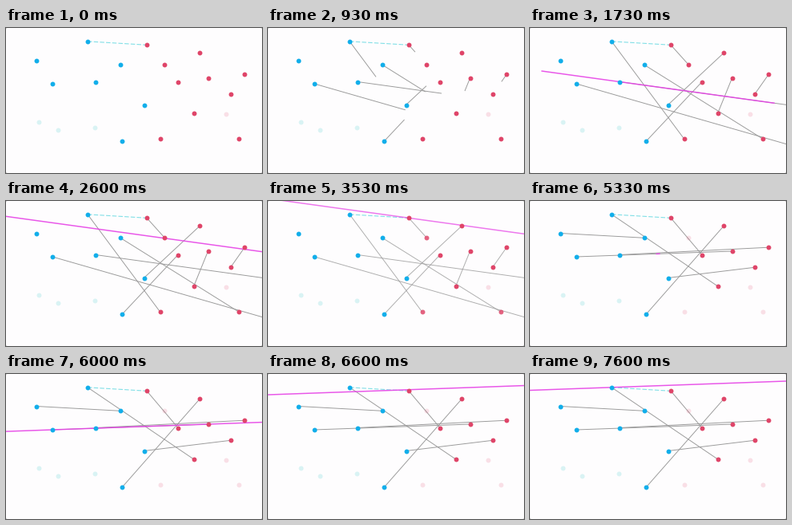
Animation of 320 by 182 pixels, one loop 7.67 s. Source, as a matplotlib script:

```python
import matplotlib.pyplot as plt
from matplotlib.animation import FuncAnimation
from matplotlib.patches import FancyBboxPatch

W, H, DPI = 320, 182, 100
FRAMES, LOOP_MS = 115, 7670
STEP = 12                # frames per animated move
ROUND_STARTS = (7.6, 65.6)
CLEAR_START = 47.6
PT = 72 / DPI            # points per pixel

BLUE, RED = "#12aeea", "#df4569"
GRAY, MAGENTA, CYAN = "#9a9a9a", "#e63fe6", "#7fdfe6"
DIM = 0.16

blue = [(38, 40.5), (58, 70), (102, 16.8), (112, 67.5), (143, 46.3),
        (172.5, 96.5), (145, 142.3)]
blue_dim = [(41, 118), (65, 128), (111, 125.3)]
red = [(176, 21.3), (242.3, 31.2), (215, 67.5), (252.5, 63), (298.3, 58.2),
       (280.7, 83.3), (234.7, 107)]
red_dropped = [(197.7, 45.5), (192.5, 139), (290.7, 139)]
red_dim = [(275, 107.5)]

# Some partners of the first round lie off stage.
pairs_1 = [(blue[2], red_dropped[1]), (blue[4], red_dropped[2]),
           (blue[5], red[1]), (blue[6], red[2]),
           (red[0], red_dropped[0]), (red[3], red[6]), (red[4], red[5]),
           (blue[1], (370, 160)), (blue[3], (400, 107.4))]
pairs_2 = [(blue[0], blue[4]), (blue[2], red[6]), (blue[1], red[3]),
           (blue[3], red[4]), (blue[5], red[5]), (blue[6], red[1]),
           (red[0], red[2])]


def ease(t):
    t = min(max(t, 0), 1)
    return 4 * t**3 if t < 0.5 else 1 - 4 * (1 - t)**3


def progress(frame, start):
    return ease((frame - start) / STEP)


fig = plt.figure(figsize=(W / DPI, H / DPI), dpi=DPI, facecolor="#c4c4c4")
ax = fig.add_axes([0, 0, 1, 1])
ax.set_xlim(0, W)
ax.set_ylim(H, 0)
ax.axis("off")
ax.add_patch(FancyBboxPatch((2, 2), W - 4, H - 4,
                            boxstyle="round,pad=2,rounding_size=2",
                            fc="#fefdfe", ec="none", zorder=0))


def dots(points, color, alpha=1):
    x, y = zip(*points)
    return ax.scatter(x, y, s=(5.9 * PT)**2, c=color, alpha=alpha,
                      linewidths=0, zorder=5)


def stroke(color, width, zorder):
    return ax.plot([], [], color=color, lw=width * PT, zorder=zorder,
                   solid_capstyle="butt")[0]


dots(blue, BLUE)
dots(blue_dim, "#d9f3f4")
dots(red, RED)
dots(red_dim, RED, DIM)
dropped = dots(red_dropped, RED)
ax.plot(*zip(blue[2], red[0]), color=CYAN, lw=1.1 * PT,
        dashes=(5, 2), zorder=2)


class Round:
    """Pairs get joined, then one line is extended and slid to the top."""

    def __init__(self, start, pairs, base, top):
        self.start, self.pairs = start, pairs
        (x0, y0), (x1, y1) = base
        self.slope = (y1 - y0) / (x1 - x0)
        self.y_base = y0 - self.slope * x0
        self.y_top = top[1] - self.slope * top[0]
        self.links = [stroke(GRAY, 0.95, 1) for _ in pairs]
        self.sweep = stroke(MAGENTA, 1.5, 3)

    def update(self, frame, alpha):
        grow = progress(frame, self.start)
        for link, ((x0, y0), (x1, y1)) in zip(self.links, self.pairs):
            link.set_data([x0, x0 + (x1 - x0) * grow],
                          [y0, y0 + (y1 - y0) * grow])
            link.set_visible(grow > 0)
            link.set_alpha(alpha)

        spread = progress(frame, self.start + STEP)
        slide = progress(frame, self.start + 2 * STEP)
        y0 = self.y_base + (self.y_top - self.y_base) * slide
        xs = [W / 2 - 400 * spread, W / 2 + 400 * spread]
        self.sweep.set_data(xs, [y0 + self.slope * x for x in xs])
        self.sweep.set_visible(spread > 0)
        self.sweep.set_alpha(0.88 * alpha)


first = Round(ROUND_STARTS[0], pairs_1, pairs_1[-1], red[0])
second = Round(ROUND_STARTS[1], pairs_2, pairs_2[2], blue[2])


def update(frame):
    cleared = progress(frame, CLEAR_START)
    first.update(frame, 1 - cleared)
    second.update(frame, 1)
    dropped.set_alpha(1 - (1 - DIM) * cleared)
    return []


anim = FuncAnimation(fig, update, frames=FRAMES, interval=LOOP_MS / FRAMES,
                     init_func=lambda: update(0), repeat=True,
                     repeat_delay=0, blit=False)
plt.show()
```
